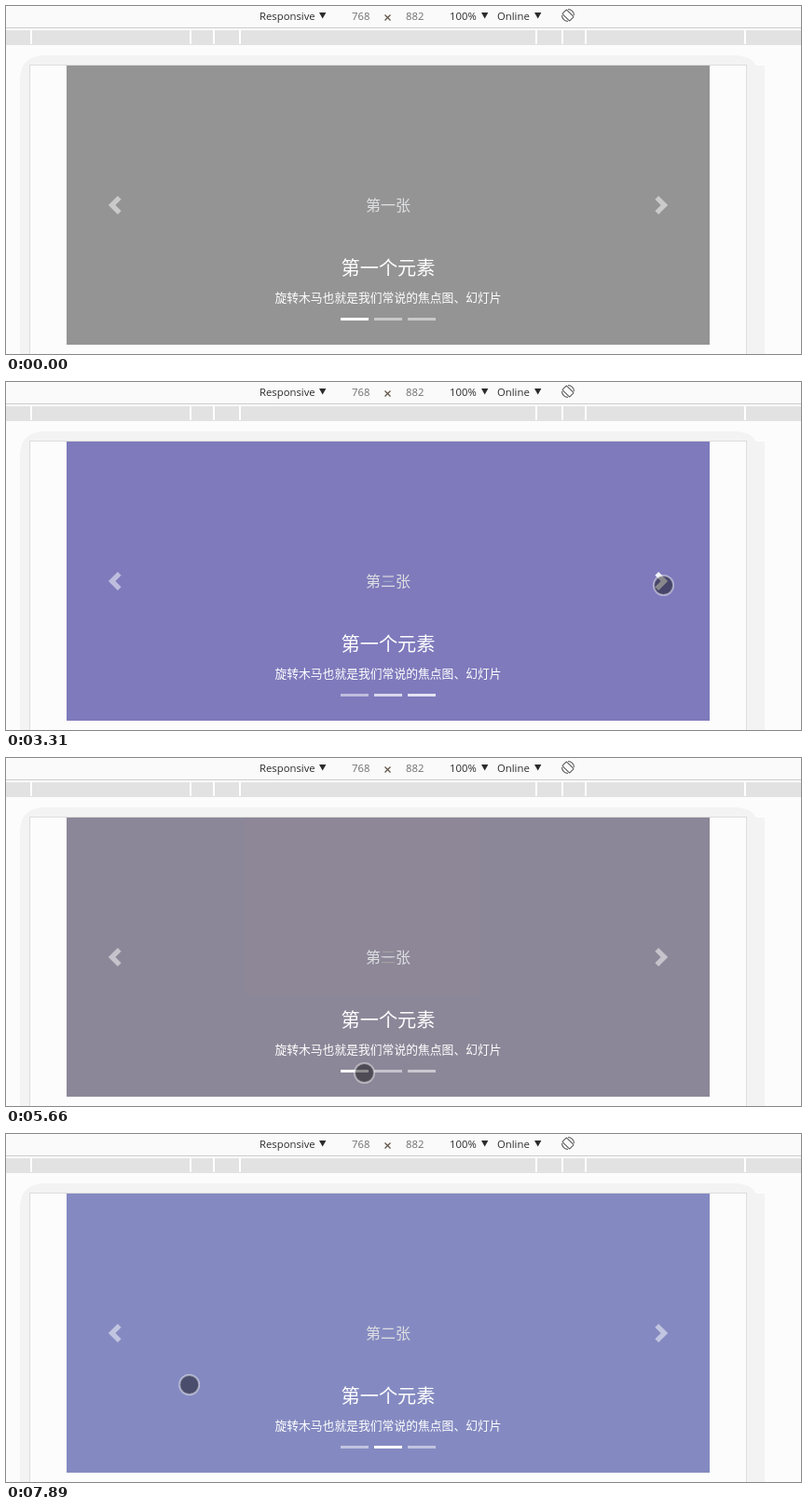
An HTML page that plays this animation: 853x374 px, repeating every 8000 ms.

```html
<!DOCTYPE html>
<html lang="zh">
<head>
<meta charset="utf-8">
<title>Carousel</title>
<style>
html, body { margin: 0; width: 100%; height: 100%; overflow: hidden; background: #fcfcfc; }
svg { display: block; width: 853px; height: 374px; }
.bar { font: 11.3px "Open Sans", sans-serif; fill: #2c2c2c; }
.dim { fill: #6e6e6e; }
.zh { font-family: "Noto Sans CJK SC", "Noto Sans CJK", sans-serif; text-anchor: middle; fill: #fff; }
.label { font-size: 16px; fill: #dedfe2; }
.title { font-size: 20.2px; }
.note { font-size: 12.8px; font-weight: 500; }
</style>
</head>
<body>
<svg viewBox="0 0 853 374">
  <defs>
    <path id="chevron" d="M5.25 0l-4 4 4 4 1.5-1.5-2.5-2.5 2.5-2.5z" fill="#fff"/>
    <path id="caret" d="M0 7h7.4l-3.7 6.5z"/>
  </defs>

  <rect width="853" height="23" fill="#fafafa"/>
  <rect y="23" width="853" height="1" fill="#cbcbcb"/>
  <g class="bar">
    <text x="272" y="15">Responsive</text>
    <text x="371" y="15" class="dim">768</text>
    <text x="429" y="15" class="dim">882</text>
    <text x="476" y="15">100%</text>
    <text x="527" y="15">Online</text>
    <use href="#caret" x="336"/>
    <use href="#caret" x="510"/>
    <use href="#caret" x="567"/>
  </g>
  <path d="M406.5 9.5l6 6m0-6l-6 6" stroke="#61564c" stroke-width="1.3"/>
  <g fill="none" stroke="#5c5c5c" stroke-width="1.1">
    <rect x="599.8" y="4.5" width="6.4" height="11" rx="1" transform="rotate(-45 603 10)"/>
    <path d="M603 3.5A6.5 6.5 0 0 1 609.500 10M603 16.5A6.5 6.5 0 0 1 596.500 10"/>
  </g>
  <rect y="26" width="853" height="16" fill="#e2e2e2"/>
  <g id="ticks" fill="#fff"></g>

  <path d="M15 374V80Q15 53 42 53H780Q799 53 805 64H814V374Z" fill="#f3f3f3"/>
  <rect x="25.5" y="63.5" width="769" height="330" fill="#fcfcfc" stroke="#dcdcdc"/>

  <g id="slides"></g>
  <use href="#chevron" opacity=".5" transform="translate(106.75 204) scale(2.5)"/>
  <use id="next" href="#chevron" transform="translate(713.25 204) scale(-2.5 2.5)"/>
  <g id="dots" fill="#fff"></g>
  <text class="zh title" x="410" y="288.5">第一个元素</text>
  <text class="zh note" x="410" y="318">旋转木马也就是我们常说的焦点图、幻灯片</text>
  <circle id="touch" r="10.5" fill-opacity=".44" stroke="#fff" stroke-opacity=".45" stroke-width="2"/>
</svg>
<script>
const LOOP = 8000, FADE = 600, CENTER = 410;
const $ = id => document.getElementById(id);
const clamp = v => Math.max(0, Math.min(1, v));
const smooth = p => p * p * (3 - 2 * p);

// Ruler marks mirror each other around the centre
$('ticks').innerHTML = [383, 212, 187, 159].flatMap(d => [CENTER - d, CENTER + d])
  .map(x => `<rect x="${x - 1}" y="26" width="2" height="15"/>`).join('');

const slides = [['一', '#949494'], ['二', '#848ac1'], ['三', '#6f52ae']];
$('slides').innerHTML = slides.map(([n, color]) =>
  `<g><rect x="65" y="64" width="690" height="300" fill="${color}"/>` +
  `<text class="zh label" x="${CENTER}" y="219.5">第${n}张</text></g>`).join('');
$('dots').innerHTML = slides.map((s, k) =>
  `<rect x="${359 + 36 * k}" y="335" width="30" height="3"/>`).join('');
const items = [...$('slides').children], dots = [...$('dots').children];

// Each tap advances to the next slide
const taps = [2245, 3100, 5225, 6850];

// Pointer moves: arrival time, duration, x, y
const moves = [[530, 130, 408, 242], [1290, 760, 688, 360], [1570, 280, 723.5, 258],
  [2090, 520, 705.5, 218.5], [4130, 430, 96.5, 224.5], [4670, 420, 401, 354],
  [5090, 420, 384.5, 338.5], [6600, 800, 561.5, 217.5]];
const SWIPE = 6750, SWIPE_END = 7890;

function pointAt(t) {
  if (t > SWIPE) {
    const s = Math.min(t, SWIPE_END) - SWIPE;
    return [366 + 195.5 * Math.cos(s / 720 * 2 * Math.PI), 217.5 + 52 * s / (SWIPE_END - SWIPE)];
  }
  let x = 34, y = 121;
  for (const [end, span, toX, toY] of moves) {
    const p = smooth(clamp((t - end + span) / span));
    x += (toX - x) * p;
    y += (toY - y) * p;
  }
  return [x, y];
}

function drawSlides(t) {
  const n = taps.filter(tap => tap <= t).length;
  const cur = n % 3, old = (n + 2) % 3;
  const p = n ? clamp((t - taps[n - 1]) / FADE) : 1;
  const glow = 1 - (1 - p) ** 2;
  // The incoming slide lies on top
  if ($('slides').lastChild !== items[cur]) $('slides').append(items[cur]);
  items.forEach((g, k) => g.setAttribute('opacity', k === cur ? smooth(p) : k === old && p < 1 ? 1 : 0));
  dots.forEach((d, k) => d.setAttribute('opacity',
    k === cur ? 0.5 + glow / 2 : k === old ? 1 - glow / 2 : 0.5));

  // The arrow stays lit until another control is tapped
  const lit = clamp((t - taps[0]) / 150) - clamp((t - taps[2]) / 150);
  $('next').setAttribute('opacity', 0.5 + 0.4 * lit);
}

function draw(now) {
  const t = now % LOOP;
  drawSlides(t);
  $('touch').setAttribute('transform', `translate(${pointAt(t)})`);
  $('touch').setAttribute('visibility', t < 400 ? 'hidden' : 'visible');
  requestAnimationFrame(draw);
}
requestAnimationFrame(draw);
</script>
</body>
</html>
```
